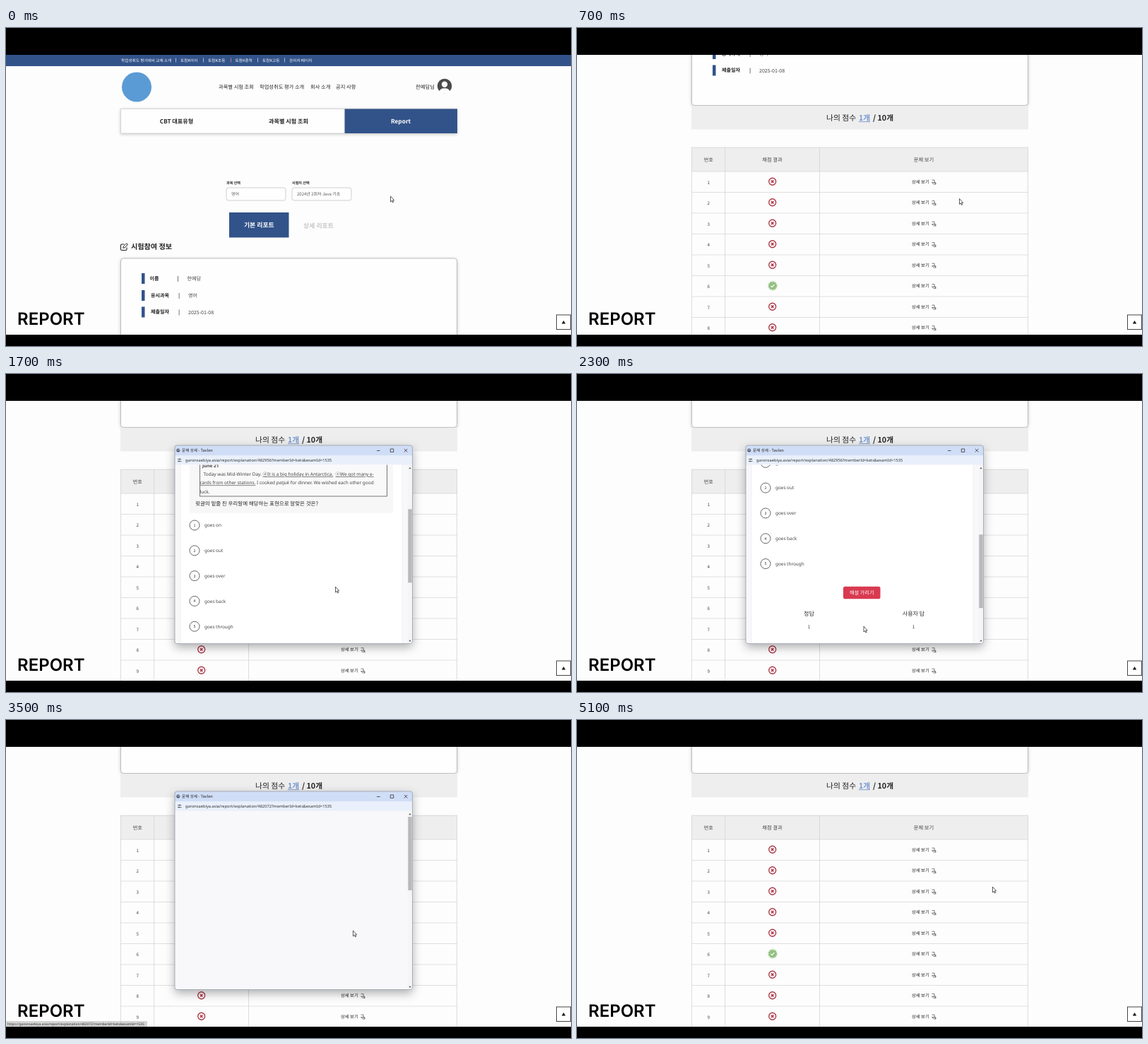
Animation of 800x450 px, one loop 5200 ms. Source, as an HTML page:

```html
<!DOCTYPE html>
<html>
<head>
<meta charset="utf-8">
<title>Report</title>
<style>
html, body { margin: 0; width: 100%; height: 100%; overflow: hidden; background: #000; }
svg { display: block; width: 800px; height: 450px; }
text { font-family: "Noto Sans CJK KR", "Noto Sans CJK JP", "Noto Sans CJK", sans-serif; text-rendering: geometricPrecision; white-space: pre; }
.latin text, text.latin { font-family: "Noto Sans", "Noto Sans CJK KR", "Noto Sans CJK JP", sans-serif; }
.card { filter: drop-shadow(0 1px 2px rgba(0,0,0,.22)); }
.shade { filter: drop-shadow(0 5px 7px rgba(0,0,0,.32)); }
</style>
</head>
<body>
<svg id="stage" viewBox="0 0 800 450" xmlns="http://www.w3.org/2000/svg"></svg>
<script>
const LOOP = 5200, STEP = 100;
const BLUE = '#325389', INK = '#2b2b2b';
const HOST = 'garonsaebiya.asia/report/explanation/';
const QUERY = '?memberId=kets&amp;examId=1535';
const NAME = '한예담';

// Text is placed by its vertical middle.
const text = (x, y, s, size, fill = INK, more = '') =>
  `<text x="${x}" y="${(y + size * .36).toFixed(2)}" font-size="${size}" fill="${fill}" ${more}>${s}</text>`;
const rect = (x, y, w, h, fill, more = '') =>
  `<rect x="${x}" y="${y}" width="${w}" height="${h}" fill="${fill}" ${more}/>`;
const path = (d, stroke, width = 1, more = '') =>
  `<path d="${d}" fill="none" stroke="${stroke}" stroke-width="${width}" ${more}/>`;
const circle = (x, y, r, fill, more = '') =>
  `<circle cx="${x}" cy="${y}" r="${r}" fill="${fill}" ${more}/>`;
const MID = 'text-anchor="middle"', BOLD = 'font-weight="700"', MEDIUM = 'font-weight="500"';

function header() {
  const nav = [[163, '학업성취도 평가대비 교재 소개'], [247, '토람K아이'], [286, '토람K초등'],
    [324.5, '토람K중학'], [363, '토람K고등'], [401, '관리자 페이지']];
  const menu = [[301, '과목별 시험 조회'], [359, '학업성취도 평가 소개'], [431, '회사 소개'], [467, '공지 사항']];
  return rect(0, 37, 800, 17, BLUE) +
    nav.map(([x, s]) => text(x, 45.5, s, 5.65, '#fff', MEDIUM)).join('') +
    [240, 279, 318, 356, 394].map(x => rect(x, 42.5, .8, 6, x === 318 ? '#e08a86' : '#c9d4e6')).join('') +
    circle(185, 83.5, 21, '#5b9bd5') +
    menu.map(([x, s]) => text(x, 83.5, s, 7.25, '#222', MEDIUM)).join('') +
    text(580, 83.5, NAME + '님', 7.3, '#222', MEDIUM) +
    circle(621, 82, 10.3, '#4b4b4b') + circle(621, 79.8, 4.2, '#fdfdfd') +
    '<path d="M613.2 91Q614 85.3 621 85.3T628.8 91L628 92.5H614Z" fill="#fdfdfd"/>';
}

function tabs() {
  return '<g class="card">' + rect(162.5, 114.5, 476, 34.5, '#fefefe', 'stroke="#cfcfcf" stroke-width=".8"') + '</g>' +
    rect(479.5, 114.5, 159.5, 34.5, BLUE) +
    text(241.5, 132, 'CBT 대표유형', 8.1, '#222', MID + BOLD) +
    text(400, 132, '과목별 시험 조회', 8.1, '#222', MID + BOLD) +
    text(559, 132, 'Report', 8.3, '#fff', MID + BOLD);
}

function form() {
  const field = (x, label, value) => text(x, 219.5, label, 5.1, '#222', BOLD) +
    rect(x, 226, 84, 18, '#fefefe', 'rx="3" stroke="#cbcbcb" stroke-width=".9"') +
    text(x + 7, 235.3, value, 6, '#555');
  return field(312, '과목 선택', '영어') + field(405, '시험지 선택', '2024년 2회차 Java 기초') +
    rect(316, 261, 84.5, 35.5, BLUE) +
    text(358.3, 279, '기본 리포트', 8.9, '#fff', MID + BOLD) +
    text(442.5, 279.5, '상세 리포트', 8.9, '#c6c6c6', MID + BOLD);
}

function info() {
  const line = (y, x, label, value) => rect(192, y - 7, 4.5, 15, BLUE) +
    text(x, y, label, 7.05, '#222', BOLD) + rect(x + 39.7, y - 3, .8, 8, '#555') +
    text(x + 53, y + .5, value, 7.05, '#444');
  return path('M167.5 306H164Q162.5 306 162.5 307.5V313Q162.5 314.5 164 314.5H169.5Q171 314.5 171 313V310.5', '#222', 1.1) +
    path('M165.8 311.3L166.2 309.2L170.4 305Q172.6 305.2 172 306.9L167.9 311Z', '#222', 1) +
    text(177, 309.7, '시험참여 정보', 10.1, '#222', BOLD) +
    '<g class="card">' + rect(162.5, 326, 476, 125.5, '#fefefe', 'rx="4" stroke="#b9b9b9" stroke-width=".9"') + '</g>' +
    line(354, 203.5, '이름', NAME) + line(378, 205, '응시과목', '영어') + line(401.5, 205, '제출일자', '2025-01-08');
}

function mark(y, right) {
  if (right) return circle(277, y, 7.5, '#dcefd3', 'opacity=".7"') + circle(277, y, 5.3, '#93c083', 'stroke="#93c083" stroke-width="1.5" stroke-dasharray="2.2 1.2"') +
    path(`M274.4 ${y + .2}l1.8 1.8l3.3-3.6`, '#fff', 1.2);
  return circle(276.7, y, 5, '#fff4f4', 'stroke="#a93545" stroke-width="1.3"') +
    path(`M275 ${y - 1.7}l3.4 3.4m0-3.4l-3.4 3.4`, '#a93545', 1.4);
}

function table() {
  const top = 545, pitch = 29.5, rows = [...Array(10).keys()];
  const cells = rows.map(i => {
    const y = top + pitch * (i + .5);
    return text(186.3, y + .5, i + 1, 6.3, '#444', MID) + mark(y - .5, i === 5) +
      text(474, y - .2, '상세 보기', 6.35, '#222', MEDIUM) +
      path(`M502.5 ${y - 2.6}h3.6v3.5l2 2.2m-.2-2.2v2.4h-2.6l-2.8-2.4z`, '#444', .7) +
      rect(162, top + pitch * (i + 1) - .4, 477, .8, '#d9d9d9');
  });
  return rect(162, 452, 477, 33.5, '#eeeeee') +
    text(353, 469, '나의 점수', 10.8, '#222') +
    text(399, 469, '1개', 10.7, '#7597d0', BOLD) + rect(399, 474.2, 16, .9, '#7597d0') +
    text(419, 469, '/ 10개', 10.7, '#222', BOLD) +
    rect(162, 511, 477, 34, '#eeeeee') + rect(162, 510.7, 477, .8, '#d4d4d4') + rect(162, 544.6, 477, .8, '#d4d4d4') +
    text(186.3, 528.5, '번호', 7.1, '#444', MID + MEDIUM) +
    text(276.5, 528.5, '채점 결과', 7.3, '#444', MID + MEDIUM) +
    text(491, 528.5, '문제 보기', 7.3, '#444', MID + MEDIUM) +
    cells.join('') +
    [162.4, 209.7, 343.4, 638.6].map(x => rect(x - .4, 511, .8, 329, '#d4d4d4')).join('');
}

const u = s => `<tspan text-decoration="underline">${s}</tspan>`;
const QUESTIONS = [{
  id: 482956, width: 265, ask: '윗글의 밑줄 친 우리말에 해당하는 표현으로 알맞은 것은?',
  lines: ['<tspan font-weight="700">June 1</tspan>', '   It is very cold outside, and the wind is strong. We stay',
    'inside the station and read books together.', '<tspan font-weight="700">June 10</tspan>',
    '   The sun does not rise these days. Still, our work 계속되다.', 'I am happy to be here with my friends.', '',
    '<tspan font-weight="700">  June 21</tspan>',
    `   Today was Mid-Winter Day. ${u('ⓓIt is a big holiday in Antarctica.')}  ${u('ⓔWe got many e-')}`,
    `${u('cards from other stations.')} I cooked <tspan font-style="italic">patjuk</tspan> for dinner. We wished each other good`, 'luck.'],
  options: ['goes on', 'goes out', 'goes over', 'goes back', 'goes through'],
  note: ["go on은 '계속되다'라는 의미로, continue(계속되다)로 바꿔 쓸 수 있다. 따라서 ①이 알맞", '다.'], answer: 1, given: 1
}, {
  id: 482072, width: 257, ask: '윗글의 빈칸에 들어갈 알맞은 말은?',
  lines: ['<tspan font-weight="700">July 3</tspan>', '   We walked to the hill near the station this morning.',
    'The snow was deep, so we moved slowly.', '<tspan font-weight="700">July 15</tspan>',
    '   I have always wanted to see the auroras. Today my', 'dream has ________. It was a wonderful day, and', '',
    'everyone at the station came out to watch. At',
    'about noon, colorful lights danced across the sky. I took pictures of the auroras.'],
  options: ['come close', 'come true', 'come across', 'come clean', 'come after'],
  note: ["come true는 '실현되다'라는 의미로, 꿈이 이루어졌다는 내용이다. 따라서 ②가 알맞", '다.'], answer: 2, given: 1
}];

function content(q) {
  const last = q.lines.length - 1;
  return rect(247, 2, 314, 564, '#fff', 'rx="5" stroke="#ececec" stroke-width=".8"') +
    rect(260, 14, 288, 183, '#f7f7f8', 'rx="3"') +
    text(268, 25, '다음 글을 읽고, 물음에 답하시오.', 7.5, INK, MEDIUM) +
    rect(274.5, 34, q.width, 139, '#f9f9fa', 'stroke="#555" stroke-width=".8"') +
    '<g class="latin">' + q.lines.map((s, i) => text(274.5, 166.3 - 12.2 * (last - i), s, 6.5, '#444')).join('') + '</g>' +
    text(268, 183, q.ask, 7.5, '#222', MEDIUM) +
    q.options.map((s, i) => {
      const y = 214 + 35.8 * i;
      return circle(267, y, 7, '#fff', 'stroke="#555" stroke-width=".9"') + text(267, y, i + 1, 5.4, '#333', MID) +
        text(281, y, s, 6.4, '#444', 'class="latin"');
    }).join('');
}

const button = (x, w, label, fill) => rect(x, 389.5, w, 17.5, fill, 'rx="2.5"') +
  text(x + w / 2, 398.2, label, 7.2, '#fff', MID + MEDIUM);

function solution(q) {
  return button(377, 52.5, '해설 가리기', '#d93a50') +
    text(328.5, 428, '정답', 8.1, '#333', MID + MEDIUM) + text(476.5, 428, '사용자 답', 8.1, '#333', MID + MEDIUM) +
    text(328.5, 446, q.answer, 6.6, '#444', MID) + text(476.5, 446, q.given, 6.6, '#444', MID) +
    rect(260, 470, 288, .7, '#ececec') +
    text(268, 494, '해설', 8.1, '#222', BOLD) +
    q.note.map((s, i) => text(268, 511 + i * 11.2, s, 7.25, '#444')).join('');
}

function frame() {
  return '<g class="shade">' + rect(239, 101, 336.5, 280.5, '#f8f8fa', 'rx="3"') + '</g>' +
    '<path d="M239 115.5V104Q239 101 242 101H572.5Q575.5 101 575.5 104V115.5Z" fill="#d0ddf6"/>' +
    rect(239, 115.5, 336.5, 13, '#eaf0fb') +
    circle(243.8, 108, 2.5, '#4a5666') + path('M242 107.4h1.5l.6 1.6m.6-2.8v1.4h1.4', '#d9e4f8', .6) +
    text(249, 108.3, '문제 상세 - Tavlen', 5.65, '#222') +
    path('M525 108.5h4.6M544.3 106h4.4v4.4h-4.4zM563.8 105.9l4.6 4.6m0-4.6l-4.6 4.6', '#333', .8) +
    path('M243 120.5h2m1.8 0h1.4M243 123.5h1m2 0h2.4', '#444', .8) +
    circle(246, 120.5, .9, '#444') + circle(245, 123.5, .9, '#444');
}

const stage = document.getElementById('stage');
stage.innerHTML = `<defs><clipPath id="view">${rect(239, 128.5, 336.5, 253, '#000')}</clipPath></defs>` +
  rect(0, 0, 800, 450, '#fdfdfd') +
  `<g id="page">${header()}${tabs()}${form()}${info()}${table()}</g>` +
  rect(779.5, 406, 20, 20.5, '#fff', 'stroke="#444" stroke-width="1"') +
  '<path d="M786.8 418.6h5.4l-2.7-4.6z" fill="#111"/>' +
  `<g id="status" class="latin">${rect(0, 426, 200, 8, '#d3d5d3')}${text(2, 430.3, '', 4.85, '#333')}</g>` +
  `<g id="popup">${frame()}${text(254, 122, '', 5.68, '#333', 'class="latin" id="url"')}
    <g clip-path="url(#view)"><g id="sheet">
      ${QUESTIONS.map((q, i) => `<g id="q${i}">${content(q)}<g id="ask${i}">${button(380, 47, '해설 보기', '#2d7bcd')}</g><g id="sol${i}">${solution(q)}</g></g>`).join('')}
    </g>
    ${rect(568.5, 128.5, 7, 253, '#f5f5f6')}
    <path d="M570.3 134.2h3.4l-1.7-2.4zM570.3 376.8h3.4l-1.7 2.4z" fill="#666"/>
    ${rect(569.3, 137, 5.4, 104, '#b9b9bb', 'id="thumb"')}</g>
    ${rect(239, 101, 336.5, 280.5, 'none', 'rx="3" stroke="#98a0ae" stroke-width=".8"')}</g>` +
  `<g id="ghost" class="shade">${rect(249.5, 112, 311.5, 258, '#050000', 'rx="3" fill-opacity=".59" stroke="#555" stroke-width=".7"')}</g>` +
  '<path id="cursor" d="M0 0V8L1.8 6.3L3 9L4.2 8.5L3 5.9H5.2Z" fill="#fff" stroke="#333" stroke-width=".8" stroke-linejoin="round"/>' +
  rect(0, 0, 800, 38, '#000') + rect(0, 434, 800, 16, '#000') +
  '<text x="16" y="420" font-size="24" font-weight="600" fill="#000" style="font-family:Inter,sans-serif">REPORT</text>';

const el = id => document.getElementById(id);
const show = (id, on) => el(id).setAttribute('display', on ? 'inline' : 'none');
const move = (id, x, y) => el(id).setAttribute('transform', `translate(${x} ${y})`);

// Linear interpolation through [time, value...] keys.
function at(keys, t) {
  const i = keys.findIndex(k => k[0] > t);
  if (i < 0) return keys[keys.length - 1].slice(1);
  const a = keys[i - 1], b = keys[i], p = (t - a[0]) / (b[0] - a[0]);
  return a.slice(1).map((v, j) => v + (b[j + 1] - v) * p);
}

const SCROLL = [[0, 0], [100, 12], [300, 140], [500, 290], [700, 342], [900, 376]];
const SHEET = [[0, 0], [1200, 0], [1500, 134], [1700, 134], [1900, 171], [2200, 171], [2500, 326], [3000, 326],
  [3001, 0], [3600, 0], [3900, 171], [4300, 171], [4600, 326]];
const POINTER = [[0, 544.5, 238], [700, 541.5, 241.5], [900, 495, 322], [1000, 491.5, 327], [1200, 491, 326],
  [1400, 470, 302], [1700, 466.5, 301], [2000, 405, 358], [2300, 406, 357], [2500, 450, 270], [2700, 561, 110],
  [2800, 562.5, 107.5], [2900, 562, 112], [3300, 492, 292], [3500, 491.5, 298], [3800, 440, 312], [4100, 388.5, 341.5],
  [4200, 400, 358], [4400, 402, 357], [4600, 480, 240], [4800, 564, 107], [4900, 565, 108], [5100, 588.5, 236]];
const VISITS = [{ open: 1000, solve: 2100, close: 2800 }, { open: 3400, solve: 4300, close: 4900 }];

function draw(t) {
  move('page', 0, -at(SCROLL, t)[0]);
  move('cursor', ...at(POINTER, t));
  const n = t < 3000 ? 0 : 1, v = VISITS[n], id = QUESTIONS[n].id, s = at(SHEET, t)[0];
  const open = t > v.open && t <= v.close, closing = t === v.close;
  show('ghost', t === v.open);
  show('popup', open);
  el('popup').setAttribute('opacity', closing ? .62 : 1);
  el('popup').setAttribute('transform', closing ? 'translate(407 241) scale(.98) translate(-407 -241)' : '');
  el('url').innerHTML = HOST + id + QUERY;
  QUESTIONS.forEach((q, i) => {
    show('q' + i, i === n && t >= v.open + 200);
    show('ask' + i, t < v.solve);
    show('sol' + i, t >= v.solve);
  });
  move('sheet', 0, 134 - s);
  el('thumb').setAttribute('y', 137 + s * .405);
  show('status', (t >= 1000 && t < 1200) || (t >= 3300 && t < 4900));
  el('status').setAttribute('opacity', t < 1200 ? .35 : 1);
  el('status').lastChild.innerHTML = 'https://' + HOST + id + QUERY;
}

const start = performance.now();
function tick() {
  const t = (performance.now() - start) % LOOP;
  draw(Math.floor(t / STEP) * STEP);
  requestAnimationFrame(tick);
}
tick();
</script>
</body>
</html>
```
